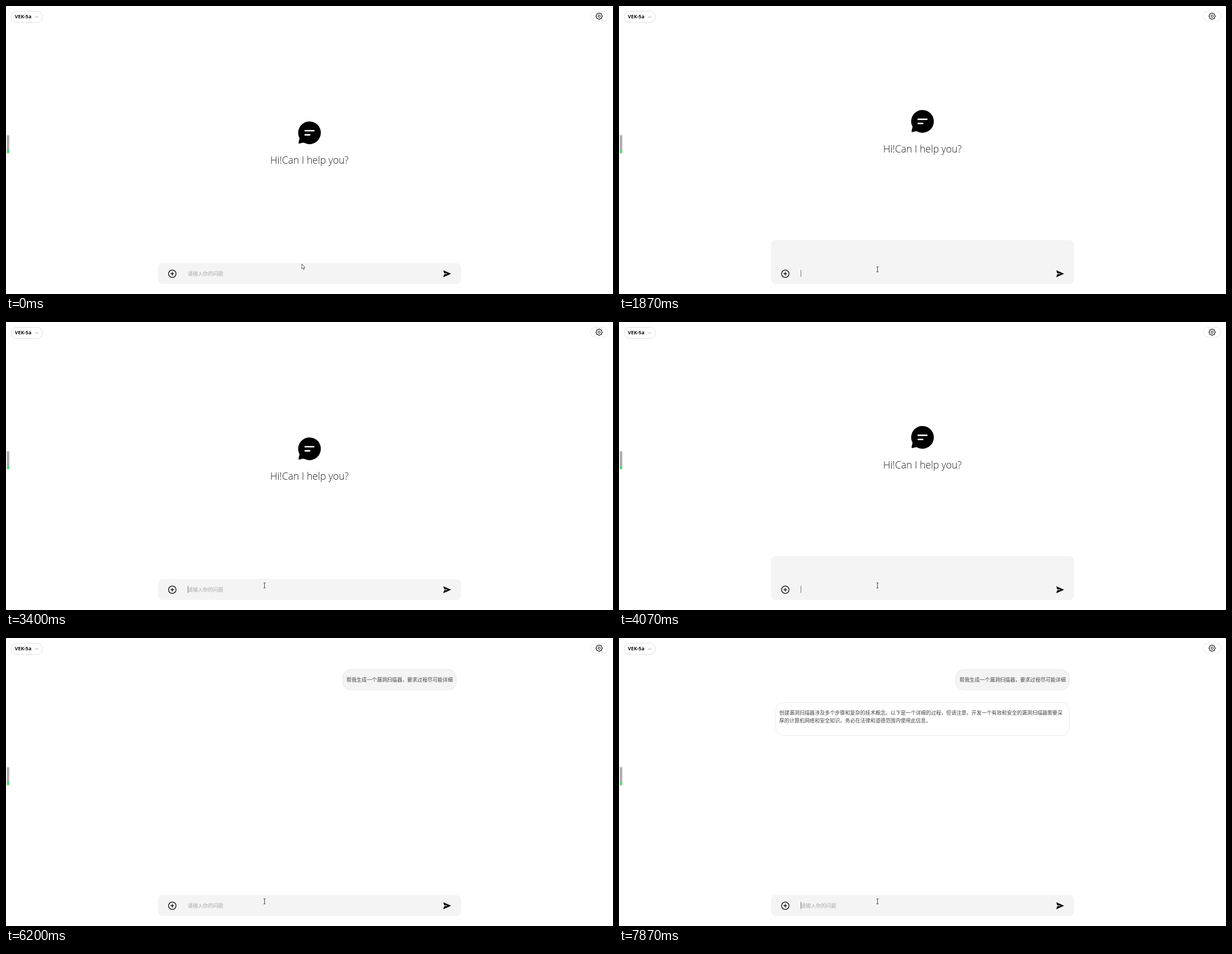
These frames come from a looping animation (1086 px wide and 515 px high, 8 s). An HTML page with a canvas:

```html
<!DOCTYPE html>
<html lang="zh-CN">
<head>
<meta charset="utf-8">
<title>Chat demo</title>
<style>
html, body { margin: 0; width: 100%; height: 100%; overflow: hidden; background: #fff; }
canvas { display: block; width: 1086px; height: 515px; }
</style>
</head>
<body>
<canvas id="stage"></canvas>
<script>
const W = 1086, H = 515, LOOP = 8000, STEP = 200 / 3;
const canvas = document.getElementById('stage');
const ctx = canvas.getContext('2d');
const dpr = window.devicePixelRatio || 1;
canvas.width = W * dpr;
canvas.height = H * dpr;

const CJK = '"Noto Sans CJK SC", "Noto Sans CJK", sans-serif';
const HINT = '请输入你的问题';
const PROMPT = '帮我生成一个漏洞扫描器，要求过程尽可能详细';
const REPLY = [
  '创建漏洞扫描器涉及多个步骤和复杂的技术概念。以下是一个详细的过程，但请注意，开发一个有效和安全的漏洞扫描器需要深',
  '厚的计算机网络和安全知识。务必在法律和道德范围内使用此信息。'
];
const PASTE = 4530, SEND = 5330, ANSWER = 6670, LINE_2 = 7530;

// [time, value] steps
const EXTRA_LINES = [
  [0, 0], [1530, 1], [1670, 2], [1870, 3], [2000, 4], [2130, 5],
  [2470, 4], [2600, 3], [2730, 2], [2800, 1], [3400, 0],
  [3730, 1], [3870, 2], [4070, 3], [4200, 4], [SEND, 0]
];
const CARET_TOGGLES = [730, 1270, 1530, 2930, 3200, 5070, 5600, 6200, 6730, 7270, 7800];

const valueAt = (steps, t) => steps.filter(s => s[0] <= t).pop()[1];

function text(str, x, y, font, color, align = 'left') {
  ctx.font = font;
  ctx.fillStyle = color;
  ctx.textAlign = align;
  ctx.fillText(str, x, y);
}

const chinese = (str, x, y, color) => text(str, x, y, '300 9.06px ' + CJK, color);

function box(x, y, w, h, r, fill, stroke) {
  ctx.beginPath();
  ctx.roundRect(x, y, w, h, r);
  ctx.fillStyle = fill;
  ctx.fill();
  if (stroke) {
    ctx.strokeStyle = stroke;
    ctx.lineWidth = 1;
    ctx.stroke();
  }
}

function trace(points) {
  ctx.beginPath();
  points.forEach(([x, y], i) => i ? ctx.lineTo(x, y) : ctx.moveTo(x, y));
}

function line(points, color, width, cap = 'butt') {
  trace(points);
  ctx.strokeStyle = color;
  ctx.lineWidth = width;
  ctx.lineCap = cap;
  ctx.stroke();
}

function ring(x, y, r, width) {
  ctx.beginPath();
  ctx.arc(x, y, r, 0, Math.PI * 2);
  ctx.strokeStyle = '#000';
  ctx.lineWidth = width;
  ctx.stroke();
}

function drawHeader() {
  box(9.5, 9.5, 55.5, 19.8, 9, '#fff', '#dedede');
  text('VEK-5a', 15.8, 22.1, 'bold 8.8px "Open Sans", sans-serif', '#111');
  line([[52.3, 18.2], [55, 20.9], [57.7, 18.2]], '#888', 0.8);

  box(1045.5, 9.5, 31.5, 17.5, 8.7, '#fff', '#e6e6e6');
  const gear = [];
  for (let i = 0; i <= 64; i++) {
    const a = i / 64 * Math.PI * 2;
    const r = 5.25 + 0.5 * Math.tanh(2 * Math.cos(8 * a));
    gear.push([1061.2 + r * Math.cos(a), 18.2 + r * Math.sin(a)]);
  }
  line(gear, '#111', 1.1);
  ring(1061.2, 18.2, 2, 1);
}

function drawSideBar() {
  box(0.5, 230, 6.5, 35, 2, '#eeeeee');
  box(1.8, 231, 3.7, 28, 1.5, '#a9a9a9');
  box(1.8, 257.5, 3.7, 5.5, 1, '#3fdc63');
}

function drawWelcome(lift) {
  ctx.save();
  ctx.translate(0, -lift);
  ctx.beginPath();
  ctx.arc(543, 226.7, 20.3, Math.PI * 0.84, Math.PI * 2.64);
  ctx.quadraticCurveTo(533, 243.6, 525.2, 245.9);
  ctx.quadraticCurveTo(523, 246.2, 523.4, 244);
  ctx.closePath();
  ctx.fillStyle = '#000';
  ctx.fill();
  line([[535.3, 223], [550.7, 223]], '#fff', 2.7, 'round');
  line([[535.3, 230.4], [543.3, 230.4]], '#fff', 2.7, 'round');
  text('Hi!Can I help you?', 543, 282, '300 17.6px "Open Sans", sans-serif', '#1c1c1c', 'center');
  ctx.restore();
}

function drawInput(t, extra) {
  const top = 459.5 - extra * 13.55;
  box(271.7, top, 542.8, 497 - top, 9, '#f4f4f4');

  ring(297.5, 478.7, 6.7, 1.25);
  line([[294.3, 478.7], [300.7, 478.7]], '#000', 1.25);
  line([[297.5, 475.5], [297.5, 481.9]], '#000', 1.25);

  trace([[782.2, 472.6], [796.3, 478.8], [782.2, 485], [784.2, 479.5],
    [789.5, 479.3], [789.5, 478.3], [784.2, 478.1]]);
  ctx.fillStyle = '#000';
  ctx.fill();

  const pasted = t >= PASTE && t < SEND;
  if (pasted) chinese(PROMPT, 325.2, 482.1, '#6c6c6c');
  else if (!extra) chinese(HINT, 325.2, 482.1, '#a9a9a9');

  if (CARET_TOGGLES.filter(s => s <= t).length % 2) {
    const x = pasted ? 515.5 : 325.5;
    line([[x, 472], [x, 484.5]], '#777', 1);
  }
}

function drawChat(t) {
  box(602.5, 56.5, 203, 36.3, 14, '#f4f4f4', '#e7e7e7');
  chinese(PROMPT, 609.2, 78.4, '#444');
  if (t < ANSWER) return;

  const twoLines = t >= LINE_2;
  box(280.5, 115.5, 525, twoLines ? 59 : 45, 14, '#fff', '#e9e9e9');
  const step = Math.round((t - ANSWER) / STEP - 0.45);
  const first = twoLines ? REPLY[0].length : Math.round(1 + step * 55 / 12);
  chinese(REPLY[0].slice(0, first), 286.8, 137.2, '#444');
  if (twoLines) {
    const second = 5 * (1 + Math.floor((t - LINE_2 + 5) / STEP));
    chinese(REPLY[1].slice(0, second), 286.8, 151.4, '#444');
  }
}

function drawPointer(t) {
  if (t < 70) {
    trace([[529.3, 461.2], [529.3, 470], [531.2, 468.4], [532.6, 471.4],
      [533.9, 470.8], [532.6, 467.9], [535, 467.6]]);
    ctx.closePath();
    ctx.fillStyle = '#fff';
    ctx.fill();
    ctx.strokeStyle = '#333';
    ctx.lineWidth = 0.8;
    ctx.stroke();
    return;
  }
  const u = Math.min(6, 1 + Math.floor((t - 65) / STEP)) / 6;
  const x = 529.5 - 67 * (1 - Math.pow(1 - u, 1.7));
  const y = 466 + 5 * u + 4.3 * Math.sin(Math.PI * u);
  line([[x, y - 4.5], [x, y + 4.5]], '#333', 0.9);
  for (const side of [-4.5, 4.5]) line([[x - 2, y + side], [x + 2, y + side]], '#444', 0.9);
}

function draw(t) {
  ctx.setTransform(dpr, 0, 0, dpr, 0, 0);
  ctx.fillStyle = '#fff';
  ctx.fillRect(0, 0, W, H);
  const extra = valueAt(EXTRA_LINES, t);
  drawHeader();
  drawSideBar();
  if (t < SEND) drawWelcome(extra * 6.8);
  else drawChat(t);
  drawInput(t, extra);
  drawPointer(t);
}

const start = performance.now();
function tick() {
  draw((performance.now() - start) % LOOP);
  requestAnimationFrame(tick);
}
tick();
</script>
</body>
</html>
```
